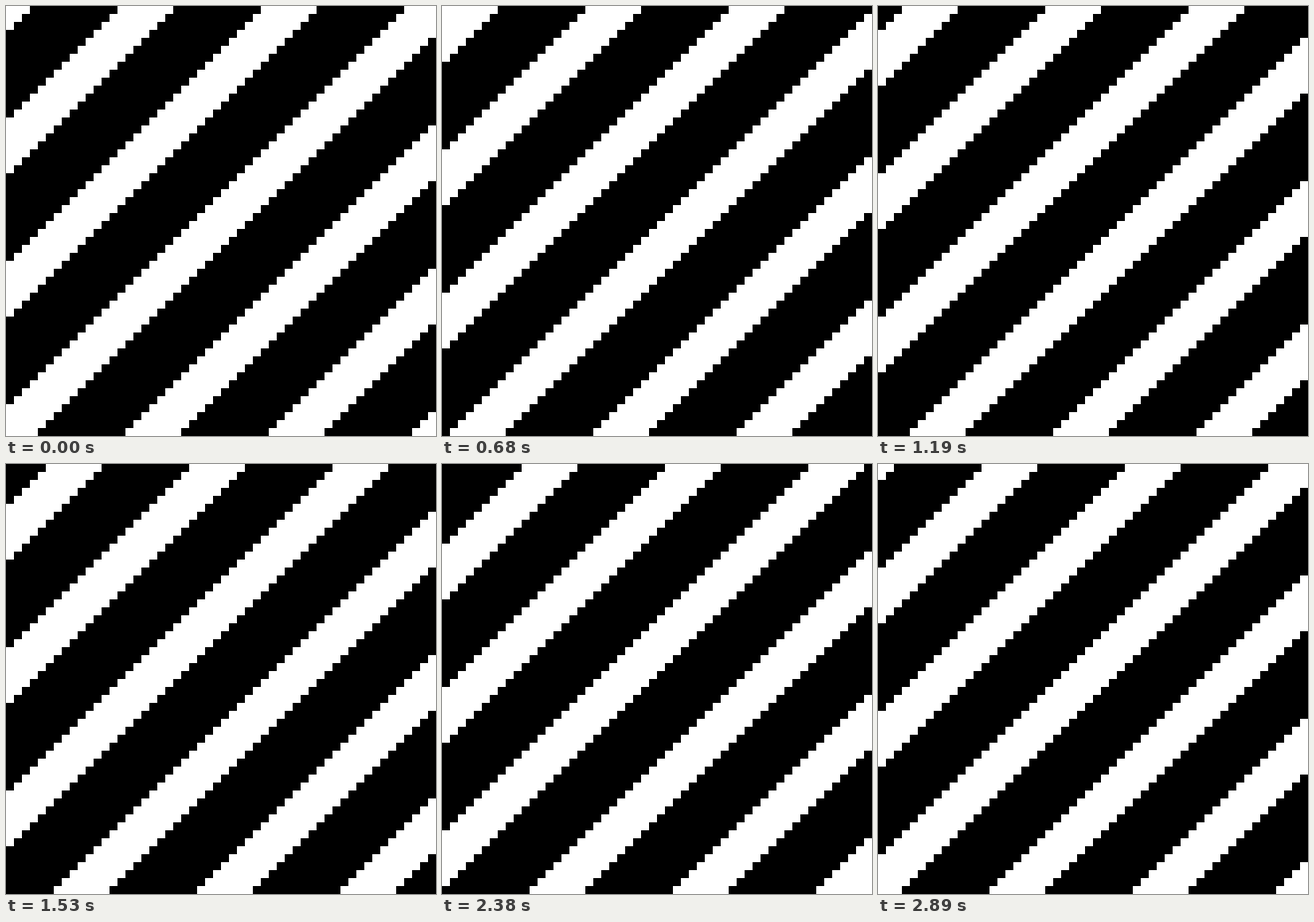
These frames come from a looping animation (540 by 540 pixels, 3060 ms). An HTML page with a canvas:

```html
<!DOCTYPE html>
<html lang="en">
<head>
<meta charset="utf-8">
<title>Diagonal stripes</title>
<style>
  html, body { margin: 0; width: 100%; height: 100%; overflow: hidden; background: #fff; }
  canvas { display: block; width: 540px; height: 540px; }
</style>
</head>
<body>
<canvas id="stage" width="540" height="540"></canvas>
<script>
const ctx = document.getElementById('stage').getContext('2d');
const CELL = 10, COUNT = 54;
const PERIOD = 18, BLACK = 11, START = 3;
const STEP_MS = 170;

// Stripes follow x + y and shift by one cell per step.
function draw(step) {
  ctx.fillStyle = '#fff';
  ctx.fillRect(0, 0, 540, 540);
  ctx.fillStyle = '#000';
  for (let y = 0; y < COUNT; y++) {
    const first = (START + step - y) % PERIOD - PERIOD;
    for (let x = first; x < COUNT; x += PERIOD) {
      ctx.fillRect(x * CELL, y * CELL, BLACK * CELL, CELL);
    }
  }
}

function tick() {
  draw(Math.floor(performance.now() / STEP_MS) % PERIOD);
  requestAnimationFrame(tick);
}
tick();
</script>
</body>
</html>
```
